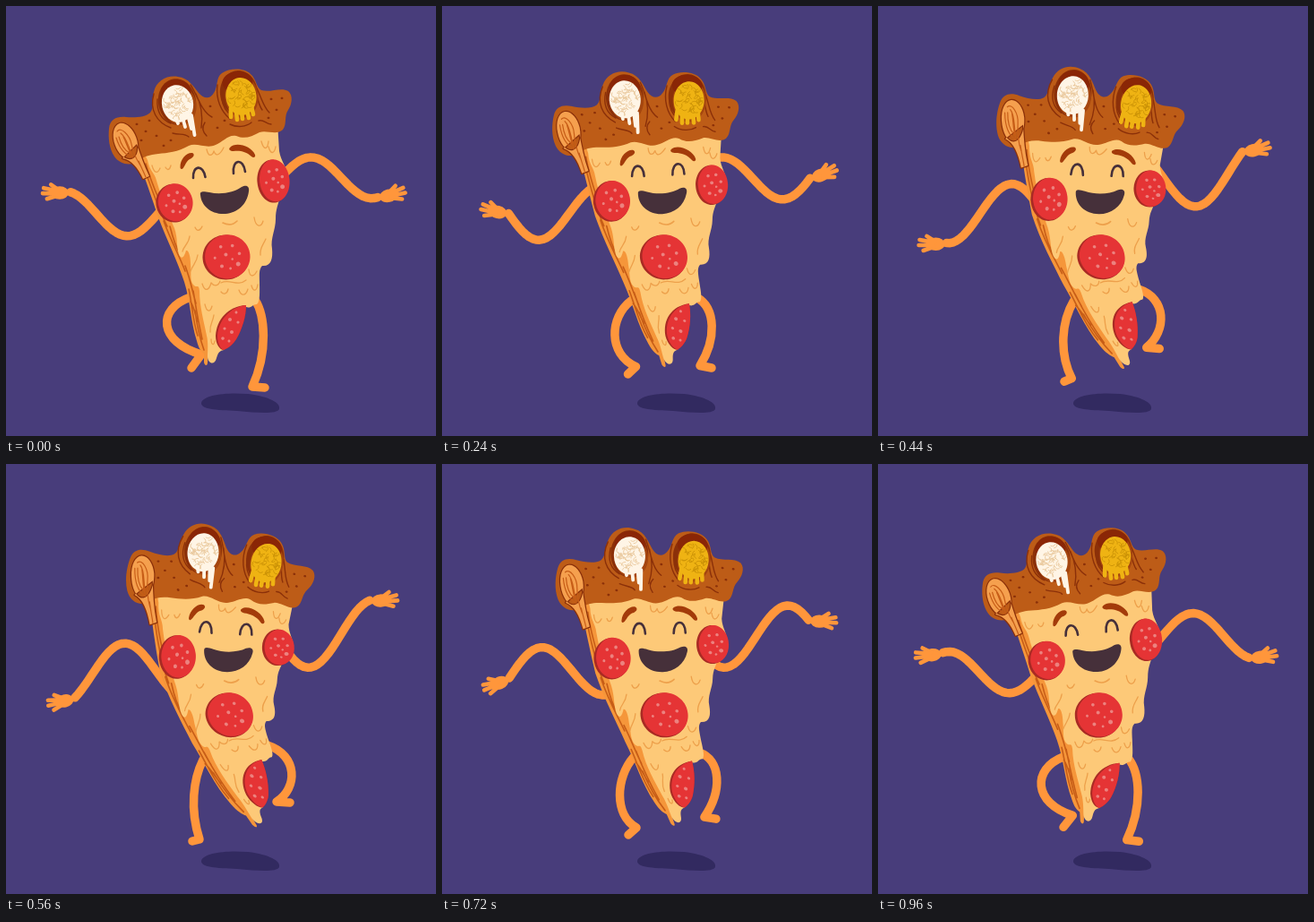
Write an HTML page that moves like this. It is 480x480 px and loops after 1000 ms.

```html
<!DOCTYPE html>
<html lang="en">
<head>
<meta charset="utf-8">
<title>Dancing pizza slice</title>
<style>
html, body { margin: 0; width: 100%; height: 100%; overflow: hidden; background: #483d7b; }
svg { display: block; width: 100%; height: 100%; }
</style>
</head>
<body>
<svg id="stage" viewBox="0 0 480 480">
  <path d="M218,443 C220,434 246,431 270,433 C294,436 307,443 305,450 C302,456 280,454 258,452 C234,451 217,450 218,443Z" fill="#322a60"/>
  <g id="limbs" fill="none" stroke="#ff963b" stroke-width="9.5" stroke-linecap="round" stroke-linejoin="round"></g>
  <g id="body" stroke-linecap="round" stroke-linejoin="round"></g>
</svg>
<script>
const NS = 'http://www.w3.org/2000/svg';
const TAU = Math.PI * 2;
const STEP = 40, COUNT = 25;
const limbs = document.getElementById('limbs');
const body = document.getElementById('body');

function add(parent, tag, attrs) {
  const el = document.createElementNS(NS, tag);
  for (const key in attrs) el.setAttribute(key, attrs[key]);
  parent.appendChild(el);
  return el;
}

// Small seeded generator for textures
let seed = 11;
const rnd = () => (seed = seed * 16807 % 2147483647) / 2147483647;

const parts = [];
function fill(d, color) {
  parts.push({ d, el: add(body, 'path', { fill: color }) });
}
function line(d, color, width) {
  parts.push({ d, el: add(body, 'path', { fill: 'none', stroke: color, 'stroke-width': width }) });
}

function oval(cx, cy, rx, ry, tilt = 0) {
  const a = tilt * Math.PI / 180, k = 0.5523;
  const p = (u, v) => {
    const x = u * rx, y = v * ry;
    return (cx + x * Math.cos(a) - y * Math.sin(a)).toFixed(2) + ',' +
           (cy + x * Math.sin(a) + y * Math.cos(a)).toFixed(2) + ' ';
  };
  return 'M' + p(1, 0) + 'C' + p(1, k) + p(k, 1) + p(0, 1) + 'C' + p(-k, 1) + p(-1, k) + p(-1, 0) +
         'C' + p(-1, -k) + p(-k, -1) + p(0, -1) + 'C' + p(k, -1) + p(1, -k) + p(1, 0) + 'Z';
}

// Spots spread over a disc; each is [u, v, radius] in disc units
const SPOTS = [[-.3, -.45, 1.8], [.2, -.5, 1.8], [.5, -.15, 1.8], [-.08, -.1, 2], [.2, .1, 1.3],
               [-.55, .05, 1.5], [-.25, .42, 2], [.45, .32, 2.5], [.12, .52, 1.4]];
function spots(cx, cy, rx, ry, tilt = 0) {
  const a = tilt * Math.PI / 180;
  fill(SPOTS.map(([u, v, r]) => {
    const x = u * rx, y = v * ry;
    return oval(cx + x * Math.cos(a) - y * Math.sin(a), cy + x * Math.sin(a) + y * Math.cos(a), r, r);
  }).join(''), '#ec827f');
}
function pepperoni(cx, cy, rx, ry, tilt) {
  fill(oval(cx - 1, cy + .6, rx, ry, tilt), '#a92a24');
  fill(oval(cx + .8, cy - .2, rx - .8, ry - .4, tilt), '#e53435');
  spots(cx + 1, cy, rx, ry, tilt);
}

// Curly strands inside an oval
function strands(cx, cy, rx, ry, tilt, count, color) {
  const a = tilt * Math.PI / 180;
  let d = '';
  for (let i = 0; i < count; i++) {
    const r = Math.sqrt(rnd()) * .85, t = rnd() * TAU;
    const u = r * Math.cos(t) * rx, v = r * Math.sin(t) * ry;
    const x = cx + u * Math.cos(a) - v * Math.sin(a), y = cy + u * Math.sin(a) + v * Math.cos(a);
    const q = rnd() * TAU, c = Math.cos(q) * 2.8, e = Math.sin(q) * 2.8;
    const at = (m, n) => (x + m).toFixed(1) + ',' + (y + n).toFixed(1) + ' ';
    d += 'M' + at(-c, -e) + 'Q' + at(e, -c) + at(c, e);
  }
  line(d, color, .9);
}

function buildBody() {
  const cheeseLine = '#eda04b', bark = '#c75d17', ink = '#46303a', dark = '#8b3009';

  // Side of the slice
  fill('M145,166 C154,188 162,212 170,236 C180,262 192,286 199,308 C206,330 206,352 213,374 C215,382 218,386 221,388 L221,398 C222,402 225,402 225,398 L226,386 L236,380 L212,300 L176,170Z', '#f5963a');
  line('M151,172 C160,196 168,222 180,246 M156,176 C162,198 172,218 178,234 M176,240 C184,262 194,280 200,296 M183,246 C186,258 190,270 194,276 M200,290 C206,306 208,318 212,332 M204,316 C208,334 208,350 214,368 M209,318 C212,336 214,350 219,372 M211,340 C213,356 216,370 221,384 M206,330 C211,338 211,346 214,352', bark, 1.6);

  // Cheese
  fill('M152,160 L158,172 C160,184 166,186 168,195 C174,216 183,236 188,248 C192,260 190,268 193,277 C196,284 199,280 201,273 C204,272 206,280 206,288 C207,298 205,306 209,311 C213,316 215,309 216,318 C216,336 221,352 224,368 C226,376 225,386 225,392 C226,400 233,401 235,393 C237,386 239,385 243,384 L256,372 L268,336 C274,338 276,332 280,333 C284,330 283,318 283,308 C283,300 282,294 286,290 C296,291 298,282 297,271 C295,259 301,250 301,238 C301,226 304,222 306,212 L314,190 C314,180 307,174 305,162 L303,130Z', '#fdc978');
  line('M163,178 C165,186 169,188 172,181 M224,160 C226,170 231,166 232,162 M232,162 C235,170 240,164 243,158 M285,151 C288,162 292,160 293,151 M293,157 C296,168 300,163 301,157 M205,257 C204,266 198,268 197,274 M206,296 C209,288 213,286 214,278 M219,310 C222,320 227,317 229,309 C232,313 237,313 239,307 M240,309 C250,304 258,314 268,306 M271,294 C272,304 277,302 280,296 M277,236 C279,248 285,247 287,240 M211,247 C213,252 217,251 219,246 M222,333 C224,342 228,342 230,335 M232,345 C231,353 227,355 228,364 M260,317 C263,325 268,323 270,316 M240,319 C243,323 247,321 248,316 M274,312 C276,320 280,318 281,311 M290,260 C287,267 283,270 284,278 M229,372 C229,378 232,380 233,374 M178,180 C180,184 183,183 184,178', cheeseLine, 1.3);

  // Toppings
  fill('M268,334 C248,335 235,350 234,368 C234,378 239,384 243,384 C248,382 254,377 257,372 C264,360 268,346 268,334Z', '#a92a24');
  fill('M268,334 C250,336 237,351 236,368 C236,378 240,383 243,384 C248,382 254,377 257,372 C264,360 268,346 268,334Z', '#e53435');
  fill([[257, 342, 1.5], [250, 350, 2], [259, 353, 1.6], [244, 360, 1.6], [252, 364, 2], [242, 371, 1.8], [249, 374, 1.5]]
    .map(([x, y, r]) => oval(x, y, r, r)).join(''), '#ec827f');
  pepperoni(246.5, 280, 26, 25, 0);
  pepperoni(188.5, 219.5, 20, 21.5, -12);
  pepperoni(299, 195, 17.5, 24, -6);

  // Face
  fill('M194.5,180 C194,171 202,163 208,164 C212,166 208,170 205,171 C200,174 199,182 196,182 C195,182 194.5,181 194.5,180Z', '#a33b0a');
  fill('M250,158 C256,151 274,156 278,166 C279,169 276,170 274,168 C268,162 260,161 254,162 C250,162 248,160 250,158Z', '#a33b0a');
  line('M209,192 C208,178 220,176 222.5,191 M254,187 C252,171 265,169 267,185', ink, 2.6);
  fill('M217,211 C216,206 221,207 227,208 C240,211 255,208 263,202 C269,199 272,202 271,207 C269,222 258,231 245,232 C229,233 218,223 217,211Z', ink);
  line('M242,242 C248,245 254,244 258,240', cheeseLine, 1.6);

  // Crust
  fill('M115,137 C116,126 124,123 134,124 C144,125 156,124 161,119 C166,113 162,104 165,96 C168,83 180,77 192,79 C204,80 210,91 215,97 C221,104 228,104 232,97 C237,90 234,80 241,75 C250,69 266,69 273,76 C280,82 279,91 285,94 C295,97 307,90 315,95 C321,100 319,110 315,116 C310,123 314,132 309,138 C302,145 291,138 283,141 C274,146 266,149 257,145 C248,143 242,152 234,155 C224,160 213,152 204,156 C192,163 180,164 170,165 C160,166 154,168 147,173 C140,179 127,177 121,168 C115,159 114,147 115,137Z', '#bd5c17');
  line('M165,98 C160,116 168,130 184,136 M169,104 C168,118 174,127 184,131 M206,88 C214,100 218,118 230,124 M212,98 C218,110 220,122 218,136 M236,88 C234,104 240,118 250,126 M241,96 C240,106 243,114 248,119 M274,82 C280,94 280,108 286,116 M280,92 C286,104 287,112 294,119 M186,142 C194,144 200,142 204,146 M222,130 C218,136 220,141 224,145 M250,132 C258,136 268,135 274,130 M282,128 C288,126 290,132 296,132', dark, 1.4);
  fill([[146, 132], [156, 140], [168, 145], [151, 150], [184, 150], [236, 136], [228, 112], [296, 104], [308, 103], [302, 116], [293, 125], [160, 128], [176, 156], [244, 128]]
    .map(([x, y]) => oval(x, y, 1.5, 1.2)).join(''), dark);

  // Rolled end
  const neck = 'M130,170 C140,172 147,180 153,193 L160,190 C154,178 150,166 146,154Z';
  line(oval(133.5, 151, 12.5, 21, -20) + neck, dark, 2.4);
  fill(oval(133.5, 151, 12.5, 21, -20) + neck, '#f5a04e');
  line('M124,140 C128,134 138,144 140,154 C142,164 146,172 150,178 M123,147 C127,160 134,167 142,169 M128,142 C134,146 136,156 140,164 M126,146 C129,157 134,162 138,164 M131,146 C135,154 136,160 141,167 M148,173 C151,180 154,186 156,191', bark, 1.2);

  // Left hollow
  fill(oval(191, 107, 21, 26, -10), dark);
  fill(oval(194, 111, 18.5, 22, -10), '#a5460f');
  fill(oval(189.5, 96, 17, 14, -8), '#8a2606');
  fill(oval(191.5, 109, 17.5, 21, -12), '#fff5e6');
  line('M189,123 L192,131 M197,124 L200,135 M203,122 L207,137 M207,122 L210.5,144', '#fff5e6', 3.8);
  strands(191.5, 108, 17, 20, -12, 52, '#e9c89b');

  // Right hollow
  fill(oval(260, 97, 21, 25, -6), dark);
  fill(oval(263, 101, 18.5, 24, -6), '#a5460f');
  fill(oval(258.5, 85, 17, 12, -4), '#8a2606');
  fill(oval(262.5, 101, 17, 21, -6), '#efb313');
  line('M251,114 L251,124 M257,118 L258,127 M263,118 L264,126 M269,116 L271,125 M274,112 L276,121', '#efb313', 4.6);
  strands(262.5, 102, 17, 21, -6, 46, '#cb9207');
}

// Bends a point of the resting slice along a curved spine
function bend(x, y, s) {
  const rigid = 150, still = 254, top = .28;
  const cx = 217 + 23 * Math.min(1, Math.max(0, (y - 120) / 100));
  const lift = 3 * Math.min(1, Math.max(0, (200 - y) / 50));
  let shift = 1.5, turn;
  if (y < still) {
    const v = still - Math.max(y, rigid);
    turn = top * v / (still - rigid);
    shift += turn * v / 2 + top * Math.max(0, rigid - y);
  } else {
    const v = y - still;
    turn = -.0018 * v;
    shift += .0025 * v * v;
  }
  const a = turn * s, off = x - cx;
  return (cx + shift * s + off * Math.cos(a)).toFixed(2) + ',' + (y - lift * s + off * Math.sin(a)).toFixed(2);
}

// Leg poses: hip, two handles, ankle, toe
const STOPS = [0, .27, .64, 1];
const LEFT_LEG = [
  [206, 325, 168, 338, 170, 375, 218, 389, 207, 404],
  [208, 331, 180, 345, 178, 385, 216, 399, 207, 408],
  [214, 327, 194, 350, 192, 392, 217, 406, 208, 414],
  [220, 330, 209, 352, 205, 385, 216, 419, 208, 421]];
const RIGHT_LEG = [
  [278, 328, 289, 345, 293, 385, 275, 425, 289, 426],
  [281, 328, 301, 345, 299, 380, 283, 409, 296, 412],
  [287, 322, 312, 330, 313, 365, 293, 394, 306, 396],
  [292, 314, 326, 325, 326, 362, 302, 377, 317, 378]];

function leg(poses, s) {
  const i = s < STOPS[1] ? 0 : s < STOPS[2] ? 1 : 2;
  const k = (s - STOPS[i]) / (STOPS[i + 1] - STOPS[i]);
  const p = poses[i].map((v, j) => (v + (poses[i + 1][j] - v) * k).toFixed(2));
  return `M${p[0]},${p[1]}C${p[2]},${p[3]} ${p[4]},${p[5]} ${p[6]},${p[7]}L${p[8]},${p[9]}`;
}

const WAVE = 140;
const swing = (n, from) => Math.sin(TAU * (n - from) / COUNT);

// Arm as a wave running leftwards; the trough drifts one wavelength per loop
function armY(x, trough, mid, amp) {
  return mid + amp * Math.cos(TAU * (x - trough) / WAVE);
}
function armPath(x0, x1, yAt) {
  let d = '';
  for (let i = 0; i <= 30; i++) {
    const x = x0 + (x1 - x0) * i / 30;
    d += (i ? 'L' : 'M') + x.toFixed(2) + ',' + yAt(x).toFixed(2);
  }
  return d;
}
// Weight that fades away from the wrist
const near = dist => Math.max(0, 1 - dist / 50) ** 2;

function makeHand() {
  const g = add(limbs, 'g', {});
  add(g, 'ellipse', { cx: -12, cy: 1, rx: 10, ry: 7.2, fill: '#ff963b', stroke: 'none' });
  add(g, 'path', { d: 'M-13,-2L-22,-8M-15,-1L-30,-4M-15,2L-31,2M-14,4L-26,8', 'stroke-width': 4.6 });
  return g;
}

const leftLeg = add(limbs, 'path', {}), rightLeg = add(limbs, 'path', {});
const leftArm = add(limbs, 'path', {}), rightArm = add(limbs, 'path', {});
const leftHand = makeHand(), rightHand = makeHand();
buildBody();

function draw(time) {
  const n = Math.floor(time / STEP) % COUNT || 1;
  const gap = Math.abs(n - .5);
  const s = Math.min(1.04, (Math.min(gap, COUNT - gap) - .5) / 11);
  const drift = WAVE * n / COUNT;

  for (const { d, el } of parts) {
    el.setAttribute('d', d.replace(/([\d.]+),([\d.]+)/g, (m, x, y) => bend(+x, +y, s)));
  }
  leftLeg.setAttribute('d', leg(LEFT_LEG, s));
  rightLeg.setAttribute('d', leg(RIGHT_LEG, s));

  const lx = 72 + 5 * s, rx = 415 - 9 * s;
  const sag = 3 - 5 * Math.cos(TAU * (n - 6) / COUNT);
  const rise = 5 + 4 * swing(n, 3);
  const leftY = x => armY(x, 141 - drift, 231, 28.5 + 4 * swing(n, 4)) + sag * near(x - lx);
  const rightY = x => armY(x, 416 - drift, 193, 29 + 6 * swing(n, 9.75)) - rise * near(rx - x);
  leftArm.setAttribute('d', armPath(lx, 190, leftY));
  rightArm.setAttribute('d', armPath(290, rx, rightY));

  const tilt = swing(n, -.5);
  leftHand.setAttribute('transform', `translate(${lx} ${leftY(lx)}) rotate(${-5 + 17 * tilt})`);
  rightHand.setAttribute('transform', `translate(${rx} ${rightY(rx)}) rotate(${-9 - 11 * tilt}) scale(-1 1)`);
}

const start = performance.now();
function tick() {
  draw(performance.now() - start);
  requestAnimationFrame(tick);
}
tick();
</script>
</body>
</html>
```
